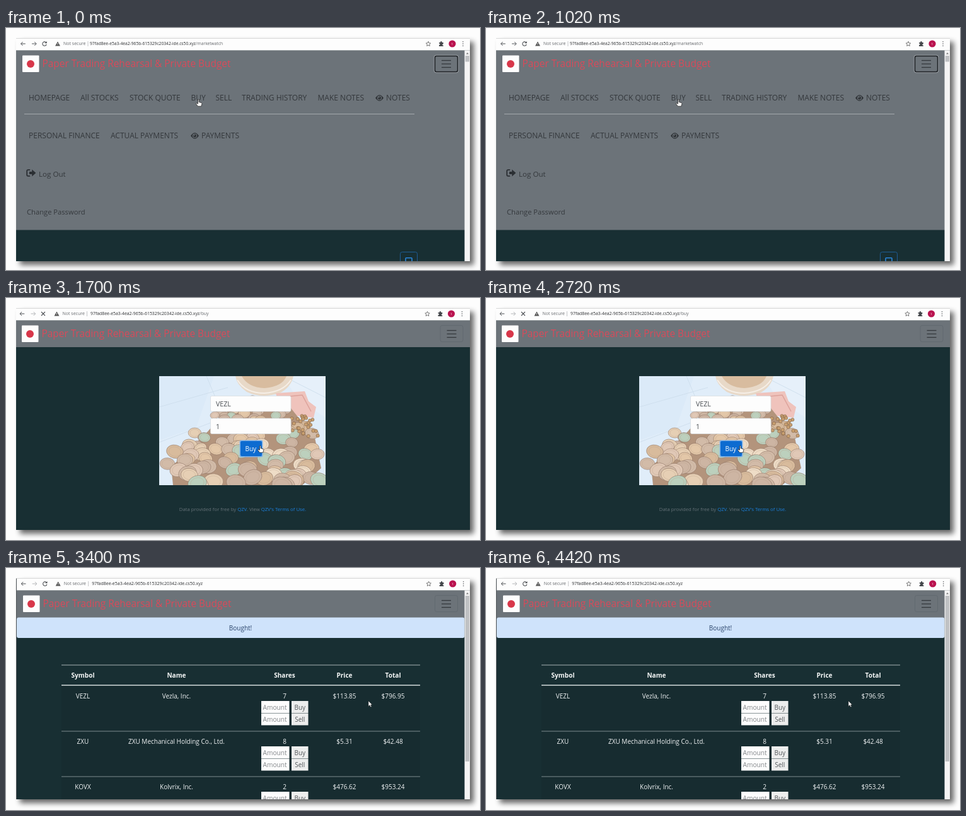
Animation, 752 px wide and 384 px high, one loop 5.1 s. Source, as an HTML page:

```html
<!DOCTYPE html>
<html lang="en">
<head>
<meta charset="utf-8">
<title>Share trading demo</title>
<style>
  html, body { margin: 0; width: 100%; height: 100%; overflow: hidden; background: #fdfdfd; }
  svg { display: block; width: 752px; height: 384px; }
  text { font-family: "Open Sans", "Noto Sans", sans-serif; white-space: pre; }
  .scene { visibility: hidden; }
  .scene.on { visibility: visible; }
</style>
</head>
<body>
<svg id="stage" viewBox="0 0 752 384">
  <defs>
    <filter id="soft" x="-5%" y="-8%" width="112%" height="120%"><feGaussianBlur stdDeviation="4.2"/></filter>
    <clipPath id="photo"><rect x="243" y="124" width="264" height="173"/></clipPath>
    <g id="eye">
      <path d="M0 0Q6.5 -9.6 13 0Q6.5 9.6 0 0Z" fill="#303438"/>
      <circle cx="6.5" r="3.6" fill="#6c7379"/>
      <circle cx="6.5" r="2.5" fill="#303438"/>
      <circle cx="5.6" cy="-1" r=".9" fill="#6c7379"/>
    </g>
    <path id="hand" d="M-1.6 -5.2Q-.7 -6.2 .2 -5.2V-1.4L4 -.5Q5 0 4.8 1.4L3.8 5.2H-1.6L-4.4 1.4Q-4.4 -.2 -3 .3L-1.6 1.5Z"
      fill="#fff" stroke="#222" stroke-width=".8"/>
    <path id="arrow" d="M0 0V8.4L2 6.6L3.4 9.6L4.9 8.9L3.5 6H6Z" fill="#fff" stroke="#222" stroke-width=".5"/>
  </defs>
</svg>
<script>
const STEP = 1700;
const PAGE = '#182f33', GREY = '#6c7379', INK = '#34383c', BLUE = '#1c80df';
const stage = document.getElementById('stage');

const rect = (x, y, w, h, fill, more = '') =>
  `<rect x="${x}" y="${y}" width="${w}" height="${h}" fill="${fill}" ${more}/>`;
const line = (x1, y1, x2, y2, color, width = 1) =>
  `<path d="M${x1} ${y1}L${x2} ${y2}" stroke="${color}" stroke-width="${width}"/>`;
const stroke = (d, color, width = 1) =>
  `<path d="${d}" fill="none" stroke="${color}" stroke-width="${width}"/>`;
const text = (x, y, size, str, fill, more = '') =>
  `<text x="${x}" y="${y}" font-size="${size}" fill="${fill}" ${more}>${str}</text>`;
const mid = (x, y, size, str, fill, more = '') =>
  text(x, y, size, str, fill, 'text-anchor="middle" ' + more);
const put = (id, x, y) => `<use href="#${id}" x="${x}" y="${y}"/>`;

function toolbar({ dx, path, size, urlX, loading, forward }) {
  const dark = '#4d5054';
  const reload = loading
    ? stroke('M57.5 22l6 6m0 -6l-6 6', dark, 1.1)
    : stroke('M63.4 22.8A3.2 3.2 0 1 0 64.2 26', dark, 1.1) + '<path d="M64.8 20.9v3.3h-3.3z" fill="#4d5054"/>';
  return rect(16, 16, 720, 19.5, '#fdfdfd') + `<g transform="translate(${dx})">` +
    stroke('M30.8 25H23.6m3 -3l-3 3l3 3', dark) +
    stroke('M41 25h7.2m-3 -3l3 3l-3 3', forward) + reload +
    '<path d="M82 21.5L86 28.5H78Z" fill="#555"/>' + line(82, 24, 82, 26.4, '#fff', .8) +
    text(91, 27.3, 7, 'Not secure', '#66696d') + line(130, 21, 130, 29, '#b5b7ba', .8) +
    text(urlX, 27.3, size,
      `97fad8ee-e5a3-4ea2-965b-615329c20342-ide.cs50.xyz<tspan fill="#65686c">${path}</tspan>`, '#2c2e31') +
    '<path d="M670 21.4l1.1 2.4l2.6 .3l-1.9 1.8l.5 2.6l-2.3 -1.3l-2.3 1.3l.5 -2.6l-1.9 -1.8l2.6 -.3z" fill="none" stroke="#555" stroke-width=".8"/>' +
    '<path d="M687 23h2q0 -2 1.4 -2t1.4 2h2v2.2q-1.5 0 -1.5 1.2t1.5 1.2v1.4h-6.8v-2q1.5 0 1.5 -1.2t-1.5 -1.2z" fill="#44474b"/>' +
    '<circle cx="708" cy="25" r="5.6" fill="#b9134f"/>' + mid(708, 27, 5.5, 't', '#f3cfdc') +
    [21.7, 25, 28.3].map(y => `<circle cx="725" cy="${y}" r=".8" fill="#55585c"/>`).join('') + '</g>';
}

function header(x, bottom, menuX, focus) {
  const edge = focus
    ? rect(menuX - .8, 43.2, 38.6, 27.6, 'none', 'rx="3" stroke="#a9adb1" stroke-width=".8"') +
      rect(menuX + .5, 44.5, 36, 25, 'none', 'rx="2.5" stroke="#1d2125" stroke-width="1.5"')
    : rect(menuX + .5, 43.5, 36, 26, 'none', 'rx="3" stroke="#616970"');
  return rect(16, 35.5, 720, bottom - 35.5, GREY) +
    rect(x, 43.5, 26.5, 26.5, '#fdfdfd', 'rx="1"') +
    `<circle cx="${x + 13}" cy="57" r="6" fill="#d8374a"/>` +
    text(x + 31.5, 62, 15.4, 'Paper Trading Rehearsal &amp; Private Budget', '#d94a5a') +
    edge + [51.5, 57, 62.5].map(y => line(menuX + 11, y, menuX + 26, y, INK, 1.3)).join('');
}

const scrollbar = thumb => rect(727.5, 35.5, 8.5, 336, '#f4f4f4') +
  '<path d="M730 41.5l2 -2.4l2 2.4z" fill="#777"/>' + rect(728.8, 44, 6.2, thumb, '#bfc1c3');

function menuScene() {
  const items = [
    [36, 115, 'HOMEPAGE'], [118, 115, 'All STOCKS'], [196, 115, 'STOCK QUOTE'], [293.5, 115, 'BUY'],
    [332.5, 115, 'SELL'], [374, 115, 'TRADING HISTORY'], [494.5, 115, 'MAKE NOTES'], [603, 115, 'NOTES'],
    [36, 175, 'PERSONAL FINANCE'], [166, 175, 'ACTUAL PAYMENTS'], [310, 175, 'PAYMENTS']
  ];
  return rect(16, 16, 720, 354, PAGE) + header(26, 320.5, 680, true) +
    toolbar({ dx: 0, path: '/marketwatch', size: 6.7, urlX: 133, forward: '#55585c' }) +
    items.map(([x, y, s]) => text(x, y, 12, s, INK)).join('') +
    put('eye', 586, 111) + put('eye', 293, 171) +
    line(29, 136.5, 648, 136.5, '#a4a9ad') +
    stroke('M38.2 225.2H35Q33.2 225.2 33.2 227V233Q33.2 234.8 35 234.8H38.2', '#2b2f33', 1.8) +
    '<path d="M37 228h4.2v-3.6l6.2 5.6l-6.2 5.6v-3.6h-4.2z" fill="#2b2f33"/>' +
    text(52, 236, 11.6, 'Log Out', INK) + text(33, 296, 11.2, 'Change Password', INK) +
    rect(625.5, 355.5, 27, 24, 'none', 'rx="3" stroke="#1d5c95"') +
    rect(634, 364.8, 10, 10, 'none', 'rx="1" stroke="#2a86dc" stroke-width="1.6"') +
    scrollbar(9.5) + put('hand', 306, 119);
}

function coins() {
  let seed = 11;
  const rnd = () => (seed = (seed * 16807) % 2147483647) / 2147483647;
  const tones = ['#e6cfb4', '#d8bb9c', '#eedcc6', '#cdb5a3', '#e0c8b6', '#e3c7a8', '#bcd0bd', '#d2bba8'];
  let out = '';
  for (let i = 0; i < 125; i++) {
    const y = 160 + i * 1.08 + rnd() * 6;
    const left = Math.max(252, 368 - (y - 150) * 1.1);
    const right = Math.min(500, 435 + (y - 160) * .95);
    const x = left + rnd() * (right - left), r = 5.5 + (y - 160) * .06 + rnd() * 3;
    const tone = tones[Math.floor(rnd() * tones.length)];
    const at = `transform="rotate(${(rnd() * 50 - 25).toFixed(0)} ${x.toFixed(1)} ${y.toFixed(1)})"`;
    const oval = (k, style) =>
      `<ellipse cx="${x.toFixed(1)}" cy="${y.toFixed(1)}" rx="${(r * k).toFixed(1)}" ry="${(r * k * .78).toFixed(1)}" ${style} ${at}/>`;
    out += oval(1, `fill="${tone}" stroke="#8d7262" stroke-opacity=".75" stroke-width=".7"`) +
      oval(.72, 'fill="none" stroke="#b49a84" stroke-opacity=".5" stroke-width=".6"');
  }
  for (let i = 0; i < 26; i++) {
    const x = 452 + rnd() * 44, y = 186 + rnd() * 34;
    out += `<circle cx="${x.toFixed(1)}" cy="${y.toFixed(1)}" r="2.6" fill="#c9a070" stroke="#7d5f45" stroke-width=".6"/>`;
  }
  return out;
}

function photo() {
  return '<g clip-path="url(#photo)">' + rect(243, 124, 264, 173, '#e0edf9') +
    '<path d="M243 124H330L302 205L243 226Z" fill="#dbeaf8"/>' +
    '<path d="M440 124H507V190L462 160Z" fill="#e6f0fa"/>' +
    stroke('M243 173L352 142M243 229L330 196M318 124L350 200M440 124L507 158M243 268L275 250', '#cddeed', .9) +
    '<path d="M364 124H456Q452 142 434 151Q405 160 382 149Q366 138 364 124Z" fill="#e8d9c8"/>' +
    '<path d="M374 124H445Q438 141 410 143Q384 142 374 124Z" fill="#d8bc9f"/>' +
    stroke('M367 130Q380 151 410 151Q440 149 452 130', '#f6efe7', 2) +
    '<path d="M428 151L474 148L480 164L492 173L488 190L452 186L434 172Z" fill="#efc3bc"/>' +
    stroke('M440 157L470 154L484 180', '#dca29b', 1.5) +
    '<path d="M366 158L440 160L490 222L500 270L470 297H265L262 268L320 212Z" fill="#b3947c"/>' +
    coins() + '</g>';
}

function buyScene() {
  const field = (y, s) => rect(324.5, y, 127.5, 24.5, '#fdfdfd', 'rx="2" stroke="#d5dade" stroke-width=".7"') +
    text(333, y + 16.8, 10.6, s, '#4a4e53');
  const link = s => `<tspan fill="${BLUE}">${s}</tspan>`;
  return rect(16, 16, 720, 352, PAGE) + header(25, 78, 688.5, false) +
    toolbar({ dx: -1.5, path: '/buy', size: 6.9, urlX: 135.5, loading: true, forward: '#b3b5b8' }) +
    photo() + field(155.5, 'VEZL') + field(191, '1') +
    rect(370.5, 225.5, 37, 27, '#7fb2ea', 'rx="3"') + rect(372, 227, 34, 24, '#0d6bd0', 'rx="2"') +
    text(379.5, 243, 10, 'Buy', '#fff') + put('hand', 404, 240) +
    mid(375.5, 338, 7.75, `Data provided for free by ${link('QZV')}. View ${link("QZV's Terms of Use.")}`, '#667278');
}

function tableScene() {
  const cols = [122, 270.5, 442, 537, 614];
  const head = ['Symbol', 'Name', 'Shares', 'Price', 'Total'];
  const rows = [
    ['VEZL', 'Vezla, Inc.', '7', '$113.85', '$796.95'],
    ['ZXU', 'ZXU Mechanical Holding Co., Ltd.', '8', '$5.31', '$42.48'],
    ['KOVX', 'Kolvrix, Inc.', '2', '$476.62', '$953.24']
  ];
  const control = (y, label) => rect(405, y, 44.5, 19, '#fdfdfd') + text(407.5, y + 13.5, 10.2, 'Amount', '#85898c') +
    rect(453, y, 26.5, 19, '#ededed') + mid(466.3, y + 13.5, 10, label, '#54585b');
  const row = (cells, i) => {
    const y = 187 + i * 72;
    return cells.map((s, c) => mid(cols[c], y + 19.6, 10, s, '#f0f3f4')).join('') +
      control(y + 24, 'Buy') + control(y + 43.5, 'Sell') + line(88, y + 72, 657, y + 72, '#7f8c8f');
  };
  return rect(16, 16, 720, 351, PAGE) + header(27, 80, 680, false) +
    toolbar({ dx: .7, path: '', size: 7, urlX: 135.5, forward: '#b3b5b8' }) +
    rect(17, 78.5, 710.5, 32.5, '#cfe3fb', 'rx="3"') + mid(372, 99, 10, 'Bought!', '#2b456b') +
    rect(88, 187, 569, 180, '#172c30') +
    line(88, 154, 657, 154, '#a9b3b5') + line(88, 186, 657, 186, '#d6dcdd', 1.6) +
    head.map((s, c) => mid(cols[c], 174, 10.1, s, '#f5f7f7', 'font-weight="700"')).join('') +
    rows.map(row).join('') + scrollbar(263) +
    line(16.5, 16, 16.5, 367, '#4a5054') + put('arrow', 575, 211);
}

const scenes = [[menuScene, 370], [buyScene, 368], [tableScene, 367]];
stage.innerHTML += scenes.map(([draw, bottom], i) =>
  `<clipPath id="win${i}">${rect(16, 16, 720, bottom - 16, '#000')}</clipPath><g class="scene">` +
  rect(22, 22, 720, bottom - 16, '#000', 'opacity=".6" filter="url(#soft)"') +
  `<g clip-path="url(#win${i})">${draw()}${line(16, 16.4, 736, 16.4, '#c9cbcc', .8)}</g></g>`
).join('');

const groups = [...stage.querySelectorAll('.scene')];
function tick() {
  const now = Math.floor(performance.now() / STEP) % groups.length;
  groups.forEach((g, i) => g.classList.toggle('on', i === now));
  requestAnimationFrame(tick);
}
tick();
</script>
</body>
</html>
```
